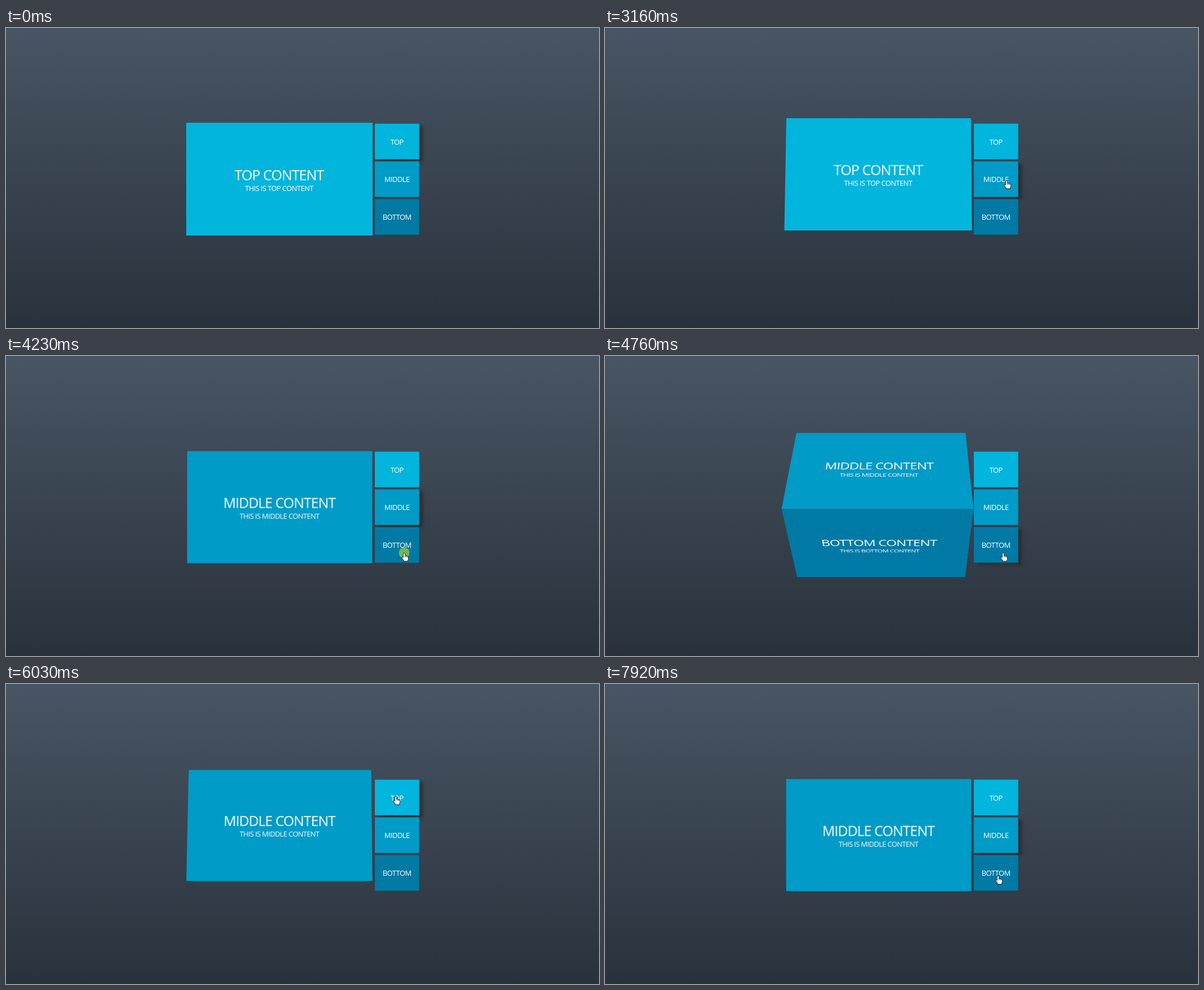
An HTML page that plays this animation: 1053x532 px, repeating every 8000 ms.

```html
<!DOCTYPE html>
<html lang="en">
<head>
<meta charset="utf-8">
<title>Cube tabs</title>
<style>
  html, body { margin: 0; width: 100%; height: 100%; overflow: hidden; }
  body { position: relative; background: linear-gradient(#485563, #29323c); }
  svg { display: block; overflow: visible; }
  text { font-family: "Open Sans", "Noto Sans", sans-serif; fill: #fff; text-anchor: middle; }
  .title { font-size: 25px; letter-spacing: -.9px; }
  .sub, .label { font-size: 13px; letter-spacing: -.6px; }
  #scene, #ui { position: absolute; left: 0; top: 0; width: 1053px; height: 532px; }
  #scene { perspective: 1055px; perspective-origin: 536px 250px; }
  #cube { position: absolute; left: 320px; top: 168px; width: 330.5px; height: 200px; transform-style: preserve-3d; }
  .face { position: absolute; inset: 0; backface-visibility: hidden; }
</style>
</head>
<body>
<div id="scene"><div id="cube"></div></div>
<svg id="ui" viewBox="0 0 1053 532">
  <defs><filter id="soft" x="-20%" y="-20%" width="140%" height="140%"><feGaussianBlur stdDeviation="2.2"/></filter></defs>
  <g id="buttons"></g>
  <circle id="click" r="9.5" fill="#ff0" fill-opacity=".45"/>
  <g id="cursor" stroke-linejoin="round">
    <path id="arrow" d="M0 0V15L3.6 11.7 6 17 8.3 16 6 10.8H10.8Z" fill="#fff" stroke="#111" stroke-width=".9"/>
    <g id="hand">
      <path d="M-1.6 1.6Q-1.4 .2 0 .2T1.6 1.6V5Q3 4.4 3.7 5.6Q5.2 5 5.9 6.3Q7.6 6 7.6 7.8V10.5Q7.6 12.4 6.6 13.4V15H-.8V13.6Q-2.4 11.8-4.2 8.8Q-4.4 7.2-2.8 7.4L-1.6 8.5Z" fill="#fff" stroke="#111" stroke-width=".9"/>
      <path d="M1.6 5V8M3.7 5.6V8.2M5.9 6.3V8.4" fill="none" stroke="#111" stroke-width=".7"/>
    </g>
  </g>
</svg>
<script>
const LOOP = 8000, ENTER = 590, CLICK_DELAY = 170;
const $ = id => document.getElementById(id);
const show = (el, on) => el.style.display = on ? '' : 'none';
const clamp = u => Math.min(1, Math.max(0, u));
const ease = u => .5 - .5 * Math.cos(Math.PI * clamp(u));
const mix = (a, b, k) => a + (b - a) * k;

const tabs = [['TOP', '#02b5dd'], ['MIDDLE', '#009bc7'], ['BOTTOM', '#007aa5']];

$('cube').innerHTML = tabs.map(([name, color], i) => `
  <div class="face" style="background:${color};transform:rotateX(${-90 * i}deg) translateZ(100px)">
    <svg width="330" height="200">
      <text class="title" x="165" y="102">${name} CONTENT</text>
      <text class="sub" x="165" y="121">THIS IS ${name} CONTENT</text>
    </svg>
  </div>`).join('');

$('buttons').innerHTML = tabs.map(([name, color], i) => {
  const y = 169.7 + 66.9 * i;
  return `<rect class="shadow" x="662" y="${y + 4}" width="78.7" height="63" fill="#2e2f32" filter="url(#soft)"/>
    <rect x="655" y="${y}" width="78.7" height="63" fill="${color}"/>
    <text class="label" x="694.2" y="${y + 36.8}">${name}</text>`;
}).join('');
const shadows = document.querySelectorAll('.shadow');

// Each click selects a tab; the cube follows shortly after.
const clicks = [
  { at: 2870, tab: 1, span: 790 },
  { at: 4230, tab: 2, span: 740 },
  { at: 5500, tab: 0, span: 560 },
  { at: 6960, tab: 1, span: 720 }
];

// Pointer trips between rests.
const trips = [
  { at: 1800, span: 200, x: 706, y: 230 },
  { at: 2350, span: 340, x: 713, y: 270 },
  { at: 3520, span: 400, x: 707, y: 349 },
  { at: 4800, span: 350, x: 692, y: 199 },
  { at: 6440, span: 320, x: 694, y: 272 },
  { at: 7360, span: 440, x: 698, y: 340 }
];

const bezier = (a, b, c, u) => mix(mix(a, b, u), mix(b, c, u), u);

function pointer(t) {
  const u = clamp((t - ENTER) / 800);
  let x = bezier(1022, 800, 722, u), y = bezier(446, -40, 273, u);
  for (const trip of trips) {
    const k = ease((t - trip.at) / trip.span);
    x = mix(x, trip.x, k);
    y = mix(y, trip.y, k);
  }
  return [x, y];
}

function turnCube(t) {
  let tab = 0, angle = 0, lift = 0;
  for (const { at, tab: next, span } of clicks) {
    const start = at + CLICK_DELAY;
    if (t < start) break;
    // A half turn starts more slowly and rises further.
    const half = Math.abs(next - tab) === 2;
    const p = ease(clamp((t - start) / span) ** (half ? 1.68 : 1));
    angle = 90 * mix(tab, next, p);
    lift = (half ? 7.5 : 1.5) * Math.sin(Math.PI * p);
    tab = next;
  }
  const back = angle < 90 ? 8 * Math.sin(angle * Math.PI / 180) : 8 + (angle - 90) / 18;
  $('cube').style.transform =
    `translate3d(0,${-lift}px,${-100 - back - lift * .35}px) rotateX(${angle}deg)`;
  shadows.forEach((s, i) => show(s, i === tab));
}

function draw(t) {
  turnCube(t);
  const [x, y] = pointer(t);
  const place = `translate(${x.toFixed(1)} ${y.toFixed(1)})`;
  for (const id of ['cursor', 'click']) $(id).setAttribute('transform', place);
  show($('cursor'), t >= ENTER);
  show($('click'), clicks.some(c => t >= c.at && t < c.at + CLICK_DELAY));
  show($('hand'), x < 734);
  show($('arrow'), x >= 734);
}

const begin = performance.now();
function tick() {
  draw((performance.now() - begin) % LOOP);
  requestAnimationFrame(tick);
}
draw(0);
requestAnimationFrame(tick);
</script>
</body>
</html>
```
